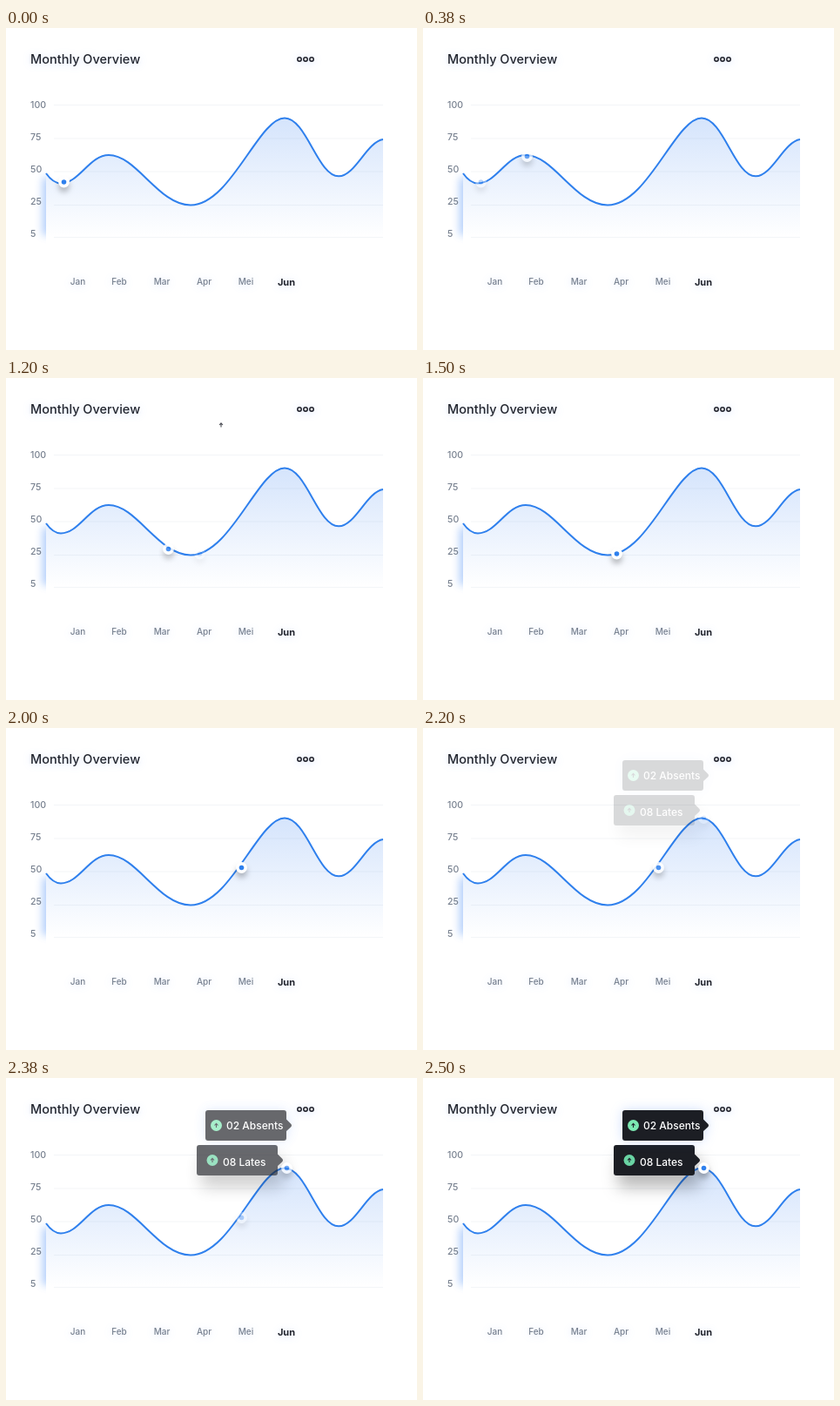
These frames come from a looping animation (472 by 370 pixels, 2900 ms). An HTML page:

```html
<!DOCTYPE html>
<html lang="en">
<head>
<meta charset="utf-8">
<title>Monthly Overview</title>
<style>
  html, body { margin: 0; width: 100%; height: 100%; overflow: hidden; background: #fff; }
  svg { display: block; width: 472px; height: 370px; font-family: Inter, Roboto, sans-serif; }

  .title { font-size: 14.5px; font-weight: 500; fill: #23262f; }
  .axis { font-size: 10.6px; font-weight: 500; fill: #77808f; }
  .months { font-size: 10px; font-weight: 500; fill: #77808f; text-anchor: middle; }
  .months .now { font-size: 11px; font-weight: 700; fill: #23262f; }
  .tip { font-size: 12px; font-weight: 500; fill: #fff; }
  .halo { filter: drop-shadow(0 1px 5px rgba(60, 120, 255, .22)); }

  .marker { filter: drop-shadow(0 5px 3px rgba(0, 0, 0, .26)); }
  .lift { filter: drop-shadow(5px 14px 9px rgba(0, 0, 0, .27)); }
  .glow { filter: drop-shadow(0 0 7px rgba(60, 120, 255, .24)); }

  /* Each cross-fade takes six 60 ms steps */
  .stop { opacity: 0; animation: visit 2.9s steps(6, start) infinite; animation-delay: calc(var(--k) * .5s - 3.4s); }
  .first { animation: leave 2.9s steps(6, start) infinite; }
  .last { opacity: 0; animation: arrive 2.9s steps(6, start) infinite; }
  @keyframes visit {
    0%, 6.89% { opacity: 0; }
    19.3%, 24.13% { opacity: 1; }
    36.54%, 100% { opacity: 0; }
  }
  @keyframes leave {
    0%, 6.89% { opacity: 1; }
    19.3%, 100% { opacity: 0; }
  }
  @keyframes arrive {
    0%, 75.86% { opacity: 0; }
    88.27%, 100% { opacity: 1; }
  }
</style>
</head>
<body>
<svg viewBox="0 0 472 370">
  <defs>
    <linearGradient id="fade" gradientUnits="userSpaceOnUse" x1="0" y1="100" x2="0" y2="241">
      <stop offset="0" stop-color="#3b82f0" stop-opacity=".22"/>
      <stop offset="1" stop-color="#3b82f0" stop-opacity="0"/>
    </linearGradient>
    <filter id="blur" x="-2" y="-1" width="5" height="3"><feGaussianBlur stdDeviation="5"/></filter>
    <clipPath id="edge"><path d="M20 140H46V265H20Z"/></clipPath>
    <path id="curve" d="M46 167C51 174 56 178.5 63 178.5C84 178.5 96 146 118 146C150 146 175 203.5 212 203.5C258 203.5 290 103.5 320 103.5C345 103.5 358 170.3 382 170.3C401 170.3 414 131 433 128"/>
    <g id="dot" class="marker">
      <circle r="6.4" fill="#fff"/>
      <circle r="2.8" fill="#2f80ed"/>
    </g>
    <path id="box" d="M3 0H90Q93 0 93 3V10.500L98 15.500Q100 17.500 98 19.500L93 24V32Q93 35 90 35H3Q0 35 0 32V3Q0 0 3 0Z" fill="#1c1e24"/>
    <path id="arrow" d="M0 2.500V-2M-2 0L0 -2.200L2 0" fill="none" stroke="#23262f" stroke-width="1.100"/>
  </defs>

  <text class="title halo" x="28" y="41">Monthly Overview</text>
  <g class="halo" fill="#fff" stroke="#1c1e28" stroke-width="1.500">
    <circle cx="337" cy="36" r="2.200"/>
    <circle cx="344" cy="36" r="2.200"/>
    <circle cx="351" cy="36" r="2.200"/>
  </g>

  <g clip-path="url(#edge)">
    <rect x="42" y="172" width="16" height="66" fill="#4a8cf5" opacity=".42" filter="url(#blur)"/>
  </g>
  <path d="M55 88.500H433M55 127H433M55 165H433M55 203.500H433M55 240.500H433" stroke="#f3f5f7"/>
  <path d="M46 167C51 174 56 178.500 63 178.500C84 178.500 96 146 118 146C150 146 175 203.500 212 203.500C258 203.500 290 103.500 320 103.500C345 103.500 358 170.300 382 170.300C401 170.300 414 131 433 128V241H46Z" fill="url(#fade)"/>
  <use href="#curve" fill="none" stroke="#2f80ed" stroke-width="2"/>

  <g class="axis">
    <text x="28" y="92">100</text>
    <text x="28" y="129">75</text>
    <text x="28" y="166">50</text>
    <text x="28" y="203">25</text>
    <text x="28" y="240">5</text>
  </g>
  <g class="months halo">
    <text x="82.500" y="295">Jan</text>
    <text x="130" y="295">Feb</text>
    <text x="179" y="295">Mar</text>
    <text x="227.500" y="295">Apr</text>
    <text x="275.500" y="295">Mei</text>
    <text class="now" x="322" y="296">Jun</text>
  </g>

  <g class="first"><use href="#dot" x="66.500" y="177"/></g>
  <g class="stop" style="--k:1"><use href="#dot" x="119.500" y="147.500"/></g>
  <g class="stop" style="--k:2">
    <use href="#dot" x="186.500" y="196.500"/>
    <use href="#arrow" x="247" y="54"/>
  </g>
  <g class="stop" style="--k:3"><use href="#dot" x="222.500" y="202"/></g>
  <g class="stop" style="--k:4"><use href="#dot" x="270.500" y="160.500"/></g>
  <g class="last">
    <g class="lift"><use href="#box" x="219" y="77"/></g>
    <g class="glow"><use href="#box" x="229" y="37"/></g>
    <circle cx="241.500" cy="54.500" r="6.500" fill="#7ce8b2"/>
    <use href="#arrow" x="241.500" y="54.500"/>
    <circle cx="237" cy="94.500" r="6.500" fill="#69d3a3"/>
    <use href="#arrow" x="237" y="94.500"/>
    <text class="tip" x="253" y="59">02 Absents</text>
    <text class="tip" x="249" y="101">08 Lates</text>
    <use href="#dot" x="322.500" y="103.500"/>
  </g>
</svg>
</body>
</html>
```
